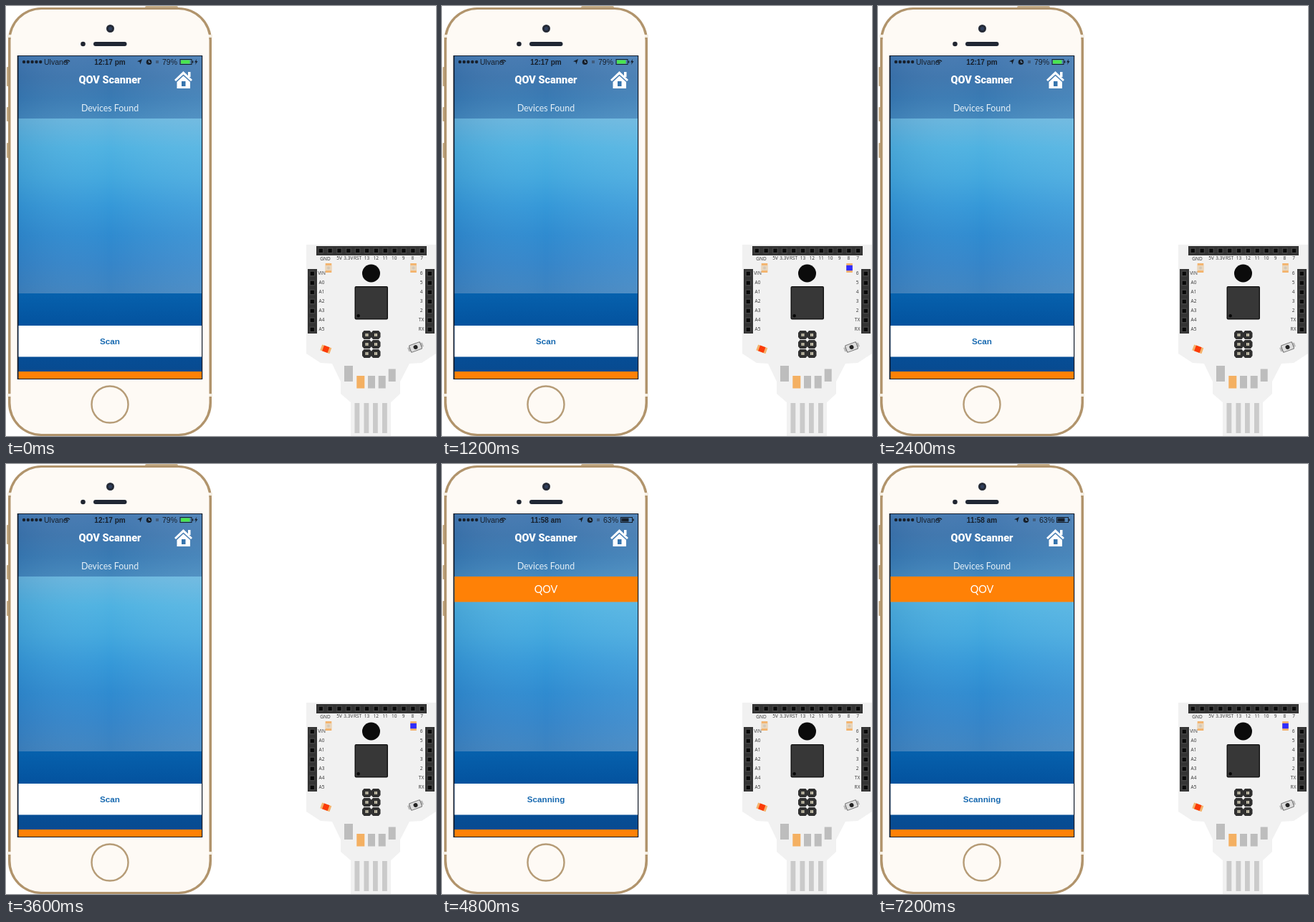
Write an HTML page with a canvas that moves like this. It is 600 by 600 pixels and loops after 8000 ms.

```html
<!DOCTYPE html>
<html lang="en">
<head>
<meta charset="utf-8">
<title>Device scan</title>
<style>
html, body { margin: 0; width: 100%; height: 100%; overflow: hidden; background: #fff; }
canvas { display: block; width: 600px; height: 600px; }
</style>
</head>
<body>
<canvas id="stage" width="600" height="600"></canvas>
<script>
const ctx = document.getElementById('stage').getContext('2d');
const LOOP = 8000, BLINK = 1200, FOUND_AT = 4800;
const GOLD = '#b1946c', ORANGE = '#ff8106', INK = '#17202c';

function rect(x, y, w, h, color) {
  ctx.fillStyle = color;
  ctx.fillRect(x, y, w, h);
}

function round(x, y, w, h, r, color) {
  ctx.beginPath();
  ctx.roundRect(x, y, w, h, r);
  ctx.fillStyle = color;
  ctx.fill();
}

function circle(x, y, r, color) {
  ctx.beginPath();
  ctx.arc(x, y, r, 0, Math.PI * 2);
  ctx.fillStyle = color;
  ctx.fill();
}

function ring(x, y, r, width, color, from = 0, to = Math.PI * 2) {
  ctx.beginPath();
  ctx.arc(x, y, r, from, to);
  ctx.lineWidth = width;
  ctx.strokeStyle = color;
  ctx.stroke();
}

function poly(points, color) {
  ctx.beginPath();
  points.forEach(([x, y]) => ctx.lineTo(x, y));
  ctx.closePath();
  ctx.fillStyle = color;
  ctx.fill();
}

function line(x1, y1, x2, y2, width, color) {
  ctx.beginPath();
  ctx.moveTo(x1, y1);
  ctx.lineTo(x2, y2);
  ctx.lineWidth = width;
  ctx.strokeStyle = color;
  ctx.stroke();
}

function text(str, x, y, font, color, align = 'center') {
  ctx.font = font;
  ctx.fillStyle = color;
  ctx.textAlign = align;
  ctx.textBaseline = 'alphabetic';
  ctx.fillText(str, x, y);
}

function gradient(x, y, w, h, colors) {
  const fill = ctx.createLinearGradient(0, y, 0, y + h);
  colors.forEach((c, i) => fill.addColorStop(i / (colors.length - 1), c));
  rect(x, y, w, h, fill);
}

function tilted(x, y, angle, draw) {
  ctx.save();
  ctx.translate(x, y);
  ctx.rotate(angle);
  draw();
  ctx.restore();
}

function phoneBody() {
  round(194, 0, 46, 6, 2, '#c8b08c');
  [[85, 27], [141, 20], [191, 21]].forEach(([y, h]) => round(1, y, 5, h, 1, '#c3aa85'));
  round(3, 2, 284, 598, 46, GOLD);
  rect(2, 40, 286, 4, '#f4eee3');
  rect(2, 541, 286, 4, '#f4eee3');
  round(6.5, 5, 277, 592, 43, '#fefaf5');

  circle(145.5, 31.5, 5.5, '#252a36');
  circle(145.5, 31.5, 2.5, '#303f5d');
  circle(107.5, 53, 3.3, '#202530');
  round(122, 50, 46.5, 6, 3, '#202734');

  ring(145, 556, 25.5, 2.4, '#b69c77');
}

function house() {
  poly([[247.5, 91], [260, 103], [258, 105], [247.5, 95.5], [237, 105], [235, 103]], '#fff');
  rect(254, 92, 3.5, 7, '#fff');
  poly([[247.5, 97.5], [257, 106], [257, 115], [238.5, 115], [238.5, 106]], '#fff');
  rect(245, 105, 5.5, 7, '#3775ae');
}

function statusBar(found) {
  const font = '10.5px "Liberation Sans", sans-serif';
  for (let i = 0; i < 5; i++) circle(25 + i * 5.8, 78, 2.2, INK);
  text('Ulvane', 53, 81.5, font, INK, 'left');

  for (const r of [2.3, 4.8]) ring(85.2, 80.5, r, 1.4, INK, Math.PI * 1.22, Math.PI * 1.78);
  circle(85.2, 80.5, 1, INK);

  text(found ? '11:58 am' : '12:17 pm', 145, 81.5, 'bold 10px "Liberation Sans", sans-serif', INK);

  const dx = found ? 7 : 0;
  poly([[190 + dx, 74], [187.4 + dx, 81.5], [186.5 + dx, 78], [183 + dx, 77.3]], INK);
  circle(199.5 + dx, 78.3, 3.8, INK);
  line(199.5 + dx, 76, 199.5 + dx, 78.7, 1, '#76a0c8');
  line(199.5 + dx, 78.5, 201.5 + dx, 78.5, 1, '#76a0c8');
  rect(209 + dx, 76, 4, 4, '#405c7d');
  text(found ? '63%' : '79%', 239 + dx, 81.5, font, INK, 'right');

  const bx = found ? 249 : 242.5;
  ctx.lineWidth = 1;
  ctx.strokeStyle = INK;
  ctx.strokeRect(bx + .5, 74.5, 16, 7);
  rect(bx + 17.3, 76.5, 1.5, 3, INK);
  rect(bx + 1.5, 75.5, found ? 10 : 12.5, 5, found ? INK : '#4be64e');
  if (!found) {
    poly([[266, 74], [263, 78.5], [265, 78.5], [264, 82], [267.5, 77], [265.5, 77]], INK);
  }
}

function screen(found) {
  rect(15.7, 69, 258.5, 452, '#101a2a');
  gradient(17.5, 70, 255.5, 87, ['#4579b1', '#3d75ad', '#397ab3', '#4387bc']);
  gradient(17.5, 157, 255.5, 244,
    ['#69b6de', '#4fb2e1', '#43a8de', '#3598d8', '#2f8bd0', '#3585c9', '#3f83bf']);
  gradient(17.5, 401, 255.5, 119, ['#0661ad', '#0454a0', '#064f98', '#08498e']);

  const glow = ctx.createLinearGradient(17, 0, 273, 0);
  glow.addColorStop(0, 'rgba(20,70,130,.12)');
  glow.addColorStop(.5, 'rgba(255,255,255,0)');
  glow.addColorStop(1, 'rgba(190,225,245,.12)');
  rect(17.5, 70, 255.5, 331, glow);

  statusBar(found);
  text('QOV Scanner', 145, 108, '900 14.5px Roboto, sans-serif', '#fff');
  house();
  text('Devices Found', 145, 147, '12.4px Lato, sans-serif', '#e5f0f8');

  if (found) {
    rect(17.5, 157, 255.5, 35.5, ORANGE);
    text('QOV', 145, 180, '14.5px Lato, sans-serif', '#fff');
  }

  rect(17.5, 446, 255.5, 43.5, '#fff');
  text(found ? 'Scanning' : 'Scan', 145, 472, 'bold 11.7px "Liberation Sans", sans-serif', '#1769b0');
  rect(17.5, 510, 255.5, 10, ORANGE);
}

function header(x, y, w, h, count, vertical) {
  rect(x, y, w, h, '#343434');
  for (let i = 0; i < count; i++) {
    const px = x + 6.3 + (vertical ? 0 : i * 12.85);
    const py = y + 6.4 + (vertical ? i * 13 : 0);
    rect(px - 4, py - 4, 8, 8, '#444');
    rect(px - 2.6, py - 2.6, 5.2, 5.2, '#090909');
  }
}

function led(x, y, color) {
  rect(x - 4.3, y - 6.5, 8.6, 13, '#f3b36c');
  rect(x - 4.3, y - 3.7, 8.6, 7.4, color);
}

function labels() {
  const put = (str, x, y) => text(str, x, y, '6.5px "Open Sans", sans-serif', '#333');
  put('GND', 445.5, 354.5);
  ['5V', '3.3V', 'RST', '13', '12', '11', '10', '9', '8', '7']
    .forEach((s, i) => put(s, 465 + i * 12.8, 354));
  ['VIN', 'A0', 'A1', 'A2', 'A3', 'A4', 'A5']
    .forEach((s, i) => put(s, 440.5, 375 + i * 13));
  ['6', '5', '4', '3', '2', 'TX', 'RX']
    .forEach((s, i) => put(s, 579.5, 375 + i * 13));
}

function board(lit) {
  poly([[419, 333], [600, 333], [600, 485], [580, 498], [563, 499], [550, 524],
    [550, 541], [537, 553], [537, 600], [481, 600], [481, 553], [467, 541],
    [467, 524], [455, 499], [439, 498], [419, 485]], '#f1f1f1');

  header(433, 335, 154, 13, 12, false);
  header(421, 367, 13, 90, 7, true);
  header(585, 367, 13, 90, 7, true);
  labels();

  led(450, 365.5, '#e9d6bd');
  circle(450, 365.5, 2, '#d3c8b8');
  led(568.5, 365.5, lit ? '#302cff' : '#e9d6bd');
  if (!lit) circle(568.5, 365.5, 2, '#d3c8b8');

  circle(509.5, 373, 12.5, '#0b0b0b');

  round(486.5, 391, 46.5, 46.5, 2, '#161616');
  rect(488, 392.5, 43.5, 43.5, '#373737');
  circle(491.7, 432.3, 2.2, '#080808');

  for (const y of [459, 472, 485]) {
    for (const x of [503.5, 516]) {
      poly([[x - 4, y - 6], [x + 4, y - 6], [x + 6.5, y - 3], [x + 6.5, y + 3],
        [x + 4, y + 6], [x - 4, y + 6], [x - 6.5, y + 3], [x - 6.5, y - 3]], '#303030');
      rect(x - 2, y - 2, 4, 4, '#d9d4bd');
      rect(x - .7, y - 2, 1.4, 4, '#918c7c');
    }
  }

  tilted(446.3, 478.8, .35, () => {
    rect(-7, -4.2, 14, 8.4, '#f4b36d');
    rect(-4, -4.2, 8, 8.4, '#fb3b08');
  });
  tilted(571.5, 476, -.35, () => {
    rect(-11, -3, 22, 6, '#b9b9b9');
    round(-8.5, -5.5, 17, 11, 1.5, '#777');
    round(-7.5, -4.5, 15, 9, 1, '#dedede');
    circle(0, 0, 3, '#242424');
  });

  const pad = '#bdbdbd';
  rect(472, 502, 12, 22, pad);
  rect(489.3, 516, 11, 17.5, '#f4b062');
  rect(505, 516, 10, 17.5, pad);
  rect(519.7, 516, 10, 17.5, pad);
  rect(533.7, 506.5, 10, 17.5, pad);
  for (const x of [486.5, 499.5, 512, 525]) rect(x, 554, 6.8, 42, '#cacaca');
}

function frame(now) {
  const t = now % LOOP;
  // The last lit state holds until the loop restarts.
  const lit = Math.min(5, Math.floor(t / BLINK)) % 2 === 1;
  rect(0, 0, 600, 600, '#fff');
  phoneBody();
  screen(t >= FOUND_AT);
  board(lit);
  requestAnimationFrame(frame);
}

frame(0);
</script>
</body>
</html>
```
